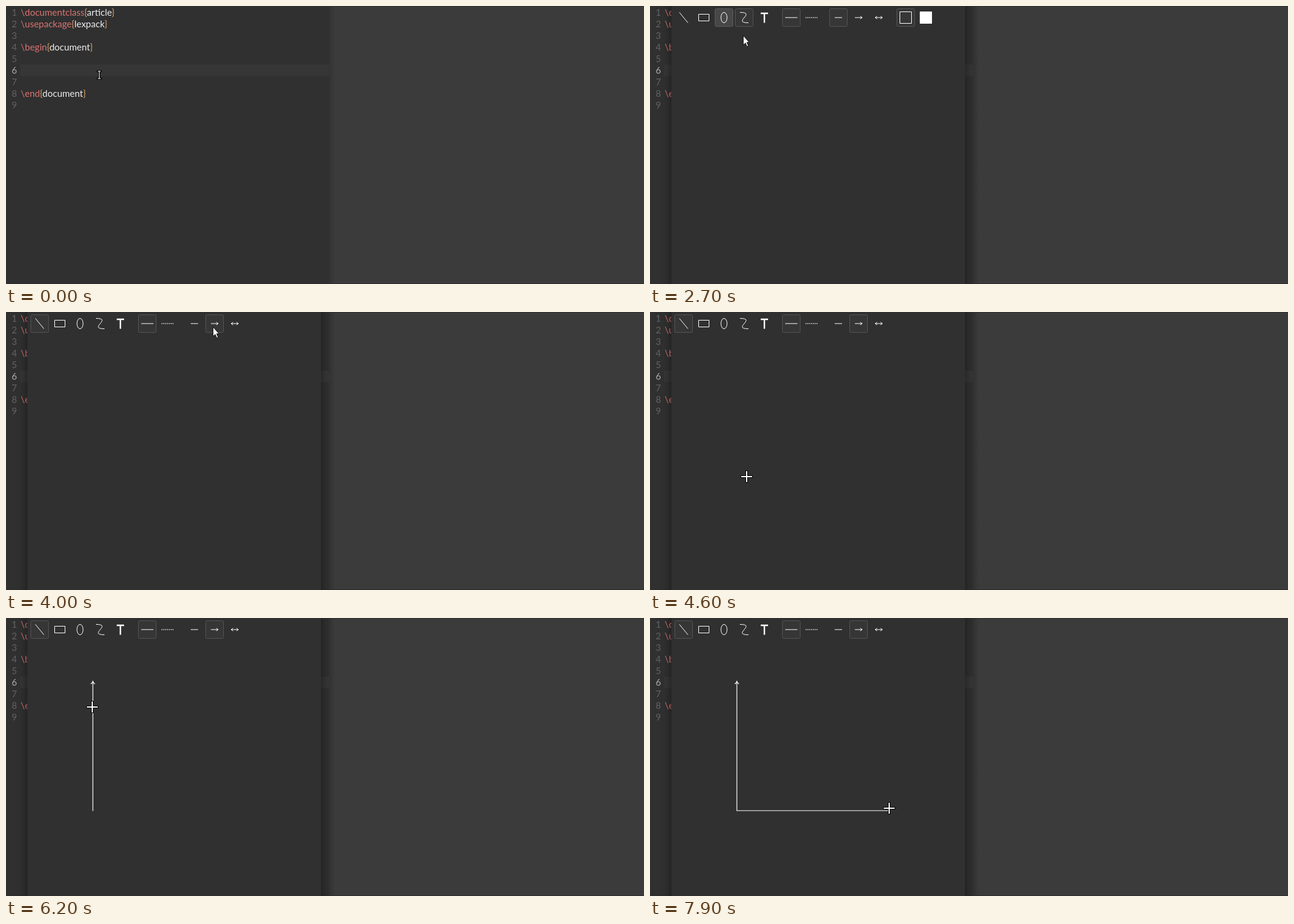
Recreate the animation shown at these times as an HTML page. Size 1043 by 456 pixels, loop 8 s.

```html
<!DOCTYPE html>
<html lang="en">
<head>
<meta charset="utf-8">
<title>Drawing axes from the editor</title>
<style>
  html, body { margin: 0; width: 100%; height: 100%; overflow: hidden; background: #303030; }
  svg { display: block; }
  text { font: 15px Lato, sans-serif; fill: #eee; white-space: pre; }
  .cmd { fill: #dc7272; }
  .brace { fill: #d9a066; }
  .num { fill: #626262; text-anchor: end; }
  .num.current { fill: #aaa; }
  .pane { fill: #303030; filter: drop-shadow(0 0 8px rgba(0, 0, 0, .5)); }
  .button rect { fill: none; }
  .button.hover rect { fill: #474747; stroke: #5c5c5c; }
  .button.checked rect { fill: #363636; stroke: #545454; }
  .icon { fill: none; stroke: #fff; }
  #text .icon { stroke-width: 2.4; }
  #dotted .icon { stroke-dasharray: 2 1; }
  #filled .icon { fill: #fff; }
  .axis { fill: none; stroke: #fff; stroke-width: 1.2; }
</style>
</head>
<body>
<svg width="1043" height="456" viewBox="0 0 1043 456">
  <defs>
    <linearGradient id="edge">
      <stop offset="0" stop-color="#323232"/>
      <stop offset="1" stop-color="#3b3b3b"/>
    </linearGradient>
  </defs>

  <rect width="1043" height="456" fill="#303030"/>
  <rect x="23" y="96" width="505" height="19" fill="#363636"/>
  <g id="code"></g>
  <rect id="caret" x="23" y="96" width="1" height="19" fill="#eee"/>

  <rect x="528" width="515" height="456" fill="#3b3b3b"/>
  <rect x="528" width="10" height="456" fill="url(#edge)"/>
  <rect x="528" width="515" height="1" fill="#2e2e2e"/>
  <rect y="455" width="1043" height="1" fill="#2c2c2c"/>

  <g id="window">
    <rect class="pane" x="35" y="-40" width="480" height="536"/>
    <g id="tools"></g>
    <path id="vertical" class="axis"/>
    <path id="horizontal" class="axis"/>
    <path id="head" class="axis" transform="translate(142 104)" d="M-3.4 4.2Q-.8 2.5 0 0Q.8 2.5 3.4 4.2"/>
  </g>

  <g id="cursor">
    <g id="beam" fill="none" transform="translate(-.5)">
      <path d="M-2.5 -6H2.5M-2.5 6H2.5M0 -6V6" stroke="#000" stroke-width="3" stroke-linecap="square"/>
      <path d="M-2.5 -6H2.5M-2.5 6H2.5M0 -6V6" stroke="#fff"/>
    </g>
    <g id="cross" fill="none">
      <path d="M-10 0H10M0 -10V10" stroke="#000" stroke-width="4"/>
      <path d="M-9 0H9M0 -9V9" stroke="#fff" stroke-width="2"/>
    </g>
    <path id="arrow" d="M.5 .5V16L4 12.7L6.5 18.5L8.8 17.5L6.4 11.7H10.3Z"
      fill="#fff" stroke="#111" stroke-linejoin="round"/>
  </g>
</svg>
<script>
const $ = id => document.getElementById(id);
const DURATION = 8000, TICK = 100;

// Editor text: [command, argument] per line
const lines = [
  ['\\documentclass', 'article'], ['\\usepackage', 'lexpack'], null,
  ['\\begin', 'document'], null, null, null, ['\\end', 'document'], null
];
const brace = c => `<tspan class="brace">${c}</tspan>`;
$('code').innerHTML = lines.map((line, i) => {
  const y = 16 + 19 * i;
  const number = `<text class="num${i === 5 ? ' current' : ''}" x="18" y="${y}">${i + 1}</text>`;
  if (!line) return number;
  const [command, argument] = line;
  return `${number}<text x="24" y="${y}"><tspan class="cmd">${command}</tspan>${brace('{')}${argument}${brace('}')}</text>`;
}).join('');

// Toolbar groups; icons are drawn around the button's centre
const box = (w, h) => `M${-w} ${-h}H${w}V${h}H${-w}Z`;
const dash = r => `M${-r} 0H${r}`;
const tip = side => `M${3 * side} -2.5Q${4 * side} -.6 ${6 * side} 0Q${4 * side} .6 ${3 * side} 2.5`;
const groups = [
  {
    line: 'M-7 -8.5L7 8.5',
    rect: box(8.5, 5.5),
    ellipse: 'M0 -8.5A5 8.5 0 0 1 0 8.5A5 8.5 0 0 1 0 -8.5Z',
    curve: 'M-7 -8.5C21 -8.5 -21 8.5 7 8.5',
    text: 'M-6 -7H6M0 -7V8.5'
  },
  { solid: dash(10), dotted: dash(10) },
  { plain: dash(6), forward: dash(6) + tip(1), both: dash(6) + tip(1) + tip(-1) },
  { outline: box(9.5, 9.5), filled: box(9.5, 9.5) }
];
const BUTTON = 30, STEP = 33, GROUP_GAP = 11;
const buttonX = {};
let nextX = 40;
for (const group of groups) {
  for (const [name, d] of Object.entries(group)) {
    buttonX[name] = nextX;
    $('tools').innerHTML += `<g id="${name}" class="button" transform="translate(${nextX + BUTTON / 2} 19)">
      <rect x="-14.5" y="-14.5" width="29" height="29" rx="2"/><path class="icon" d="${d}"/></g>`;
    nextX += STEP;
  }
  nextX += GROUP_GAP;
}

// Pointer moves, each starting where the previous one ended
const moves = [
  { from: 1000, to: 1100, x: 159, y: 103 },
  { from: 2000, to: 2400, x: 152, y: 59 },
  { from: 2500, to: 2700, x: 152, y: 48 },
  { from: 2700, to: 2900, x: 51, y: 21 },
  { from: 3200, to: 3400, x: 268, y: 44 },
  { from: 3500, to: 3800, x: 338, y: 24 },
  { from: 4000, to: 4400, x: 174, y: 221 },
  { from: 4400, to: 4900, x: 142, y: 316 },
  { from: 5000, to: 5900, x: 142, y: 105 },
  { from: 6100, to: 6800, x: 138, y: 316 },
  { from: 7100, to: 7900, x: 391, y: 312 }
];
const easeOut = k => 1 - (1 - k) ** 1.4;

function pointer(t) {
  let x = 153, y = 113;
  for (const m of moves) {
    if (t <= m.from) break;
    const k = easeOut(Math.min(1, (t - m.from) / (m.to - m.from)));
    x += (m.x - x) * k;
    y += (m.y - y) * k;
  }
  return { x: Math.round(x), y: Math.round(y) };
}

// Buttons react slightly ahead of the drawn pointer
function isHovered(name, t) {
  const { x, y } = pointer(t + 40);
  return y < 46 && x >= buttonX[name] && x < buttonX[name] + BUTTON;
}

const show = (id, on) => { $(id).style.display = on ? '' : 'none'; };

function render(t) {
  const { x, y } = pointer(t);
  const kind = t < 1500 ? 'beam' : y < 50 ? 'arrow' : 'cross';
  for (const id of ['beam', 'cross', 'arrow']) show(id, id === kind);
  $('cursor').setAttribute('transform', `translate(${x} ${y})`);

  show('caret', t >= 1100 && t < 1600);
  show('window', t >= 1400);
  $('window').style.opacity = Math.min(1, (t - 1300) / 300);

  const lineTool = t >= 3100;
  const checked = [lineTool ? 'line' : 'curve', 'solid', t < 3900 ? 'plain' : 'forward', 'outline'];
  for (const name in buttonX) {
    $(name).classList.toggle('checked', checked.includes(name));
    $(name).classList.toggle('hover', isHovered(name, t));
  }
  show('outline', !lineTool);
  show('filled', !lineTool);

  show('vertical', t >= 5000);
  show('head', t >= 5900);
  show('horizontal', t >= 7200);
  $('vertical').setAttribute('d', `M142 316.5V${pointer(Math.min(t, 5900)).y - 1}`);
  $('horizontal').setAttribute('d', `M142 316H${x}`);
}

const start = performance.now();
function frame() {
  const t = (performance.now() - start) % DURATION;
  render(Math.floor(t / TICK) * TICK);
  requestAnimationFrame(frame);
}
frame();
</script>
</body>
</html>
```
